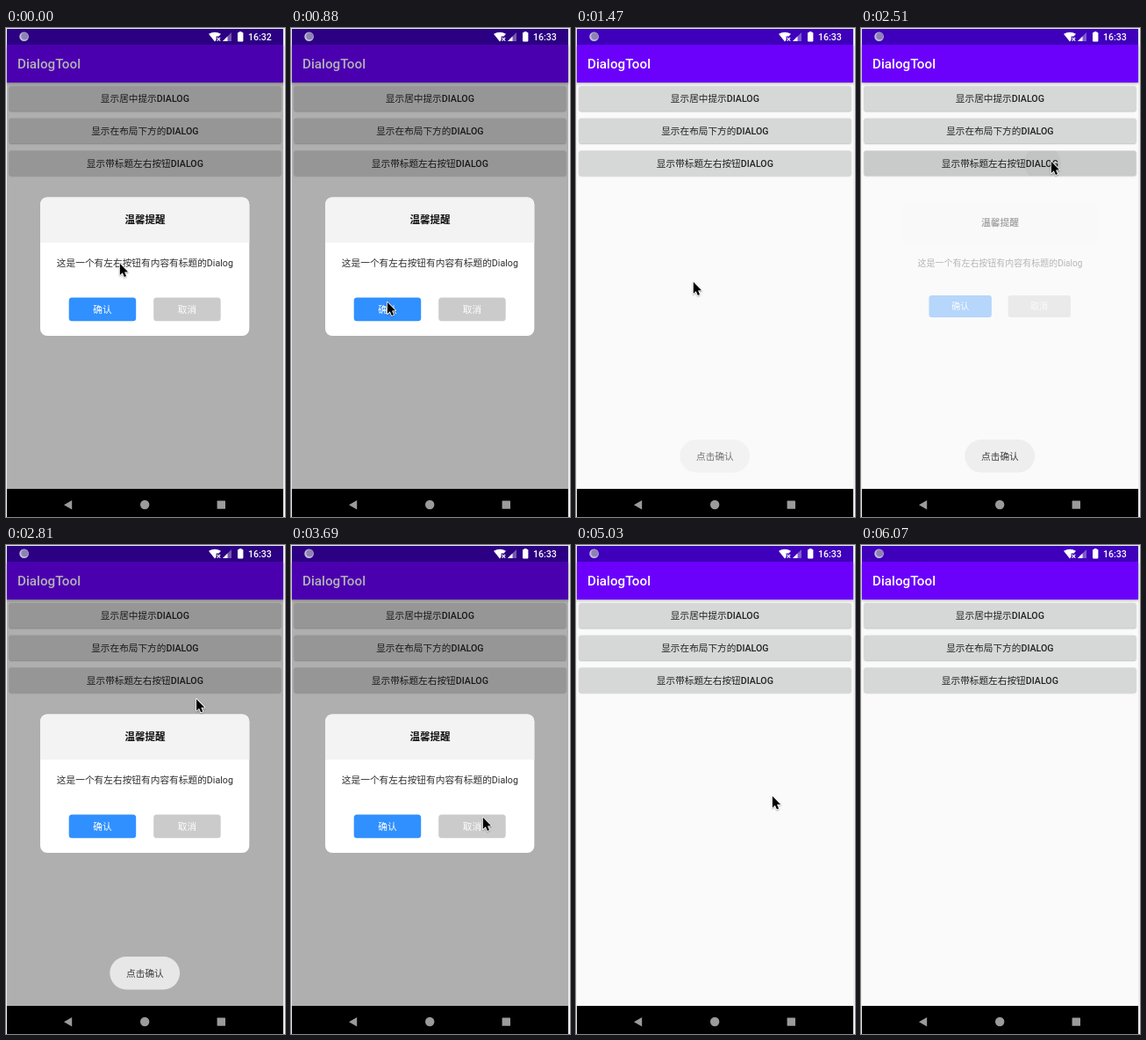
Recreate the animation shown at these times as an HTML page with a canvas. Size 318x556 px, loop 6370 ms.

```html
<!DOCTYPE html>
<html lang="zh">
<head>
<meta charset="utf-8">
<title>DialogTool</title>
<style>
html, body { margin: 0; width: 100%; height: 100%; overflow: hidden; background: #ededed; }
canvas { display: block; width: 318px; height: 556px; }
</style>
</head>
<body>
<canvas id="stage"></canvas>
<script>
const W = 318, H = 556, LOOP = 6370;
const STEP = 147.7; // ms between screen refreshes; all motion below counts in steps
const ratio = window.devicePixelRatio || 1;

function fit(canvas) {
  canvas.width = W * ratio;
  canvas.height = H * ratio;
  const pen = canvas.getContext('2d');
  pen.scale(ratio, ratio);
  return pen;
}

const stage = fit(document.getElementById('stage'));
const layer = fit(document.createElement('canvas'));
let ctx = stage;

const LATIN = 'Roboto, "Noto Sans", sans-serif';
const HAN = '"Noto Sans CJK SC", "Noto Sans CJK", Roboto, sans-serif';
const MID = 158.4;

const ramp = (s, a, b) => Math.min(1, Math.max(0, (s - a) / (b - a)));
const mix = (a, b, p) => a + (b - a) * p;
const linear = p => p;
const easeInOut = p => p < .5 ? 4 * p ** 3 : 1 - 4 * (1 - p) ** 3;

// Open from the start, closed at step 8, opened at 16.5, closed again at 26.
function presence(s, openLag, openTime, closeLag, closeTime) {
  const part = (at, lag, time) => ramp(s, at + lag, at + lag + time);
  return 1 - part(8, closeLag, closeTime) + part(16.5, openLag, openTime) - part(26, closeLag, closeTime);
}

const MOVES = [
  { from: 2, to: 6, x: 109, y: 311, ease: linear },
  { from: 9, to: 10, x: 133, y: 288, ease: linear },
  { from: 10, to: 14, x: 216, y: 151, ease: linear },
  { from: 17, to: 23, x: 218, y: 309, ease: easeInOut }
];

function cursorAt(s) {
  let x = 129, y = 267;
  for (const move of MOVES) {
    const p = move.ease(ramp(s, move.from, move.to));
    x = mix(x, move.x, p);
    y = mix(y, move.y, p);
  }
  // leaves in an arc: up a little, then down off the screen
  const p = ramp(s, 33, 41);
  const bend = (a, b, c) => mix(mix(a, b, p), mix(b, c, p), p);
  return [bend(x, 238, 262), bend(y, 180, 556)];
}

function rect(x, y, w, h, color) {
  ctx.fillStyle = color;
  ctx.fillRect(x, y, w, h);
}

function box(x, y, w, h, r, color) {
  ctx.beginPath();
  ctx.roundRect(x, y, w, h, r);
  ctx.fillStyle = color;
  ctx.fill();
}

function disc(x, y, r, color) {
  ctx.beginPath();
  ctx.arc(x, y, r, 0, Math.PI * 2);
  ctx.fillStyle = color;
  ctx.fill();
}

function poly(points, color) {
  ctx.beginPath();
  points.forEach(([x, y]) => ctx.lineTo(x, y));
  ctx.closePath();
  ctx.fillStyle = color;
  ctx.fill();
}

function label(str, x, y, font, color) {
  ctx.font = font;
  ctx.fillStyle = color;
  ctx.fillText(str, x, y);
  return ctx.measureText(str).width;
}

// Centres a Chinese run followed by a Latin run.
function centred(han, latin, x, y, color, size = 10.67, hanWeight = 400, latinWeight = 500) {
  const hanFont = `${hanWeight} ${size}px ${HAN}`;
  const latinFont = `${latinWeight} ${size}px ${LATIN}`;
  ctx.font = hanFont;
  let width = ctx.measureText(han).width;
  ctx.font = latinFont;
  width += ctx.measureText(latin).width;
  const left = x - width / 2;
  const advance = label(han, left, y, hanFont, color);
  if (latin) label(latin, left + advance, y, latinFont, color);
}

function shadow(blur, dy, alpha) {
  ctx.shadowColor = `rgba(0,0,0,${alpha})`;
  ctx.shadowBlur = blur * ratio;
  ctx.shadowOffsetY = dy * ratio;
}

// Paints onto a separate layer so that overlapping parts fade as one.
function faded(alpha, paint) {
  ctx = layer;
  ctx.clearRect(0, 0, W, H);
  paint();
  ctx = stage;
  ctx.save();
  ctx.globalAlpha = alpha;
  ctx.drawImage(layer.canvas, 0, 0, W, H);
  ctx.restore();
}

function zoomed(scale, paint) {
  ctx.save();
  ctx.translate(MID, 271);
  ctx.scale(scale, scale);
  ctx.translate(-MID, -271);
  paint();
  ctx.restore();
}

function drawApp(press) {
  rect(1, 1, 315, 523, '#fafafa');
  ctx.save();
  shadow(3, 1, .35);
  rect(1, 19, 315, 43, '#6b00fb');
  ctx.restore();
  rect(1, 1, 315, 18, '#3e00ba');
  label('DialogTool', 13, 46.4, `500 15.2px ${LATIN}`, '#fff');

  ['显示居中提示', '显示在布局下方的', '显示带标题左右按钮'].forEach((text, i) => {
    const y = 66 + i * 36.7;
    ctx.save();
    shadow(1.5, .6, .25);
    box(3.5, y, 310, 28.6, 2, '#d6d7d7');
    ctx.restore();
    if (i === 2 && press > 0) {
      ctx.save();
      ctx.beginPath();
      ctx.roundRect(3.5, y, 310, 28.6, 2);
      ctx.clip();
      rect(3, y, 311, 29, `rgba(0,0,0,${.06 * press})`);
      disc(207, 154, 21 * press, `rgba(0,0,0,${.035 * press})`);
      ctx.restore();
    }
    centred(text, 'DIALOG', MID, y + 18.4, '#222');
  });
}

function drawStatus(clock) {
  disc(20.6, 9.8, 5.3, '#c3bbdc');
  disc(21.3, 9.2, 4, '#8d82b4');

  // wifi without connection
  ctx.beginPath();
  ctx.moveTo(238, 15.5);
  ctx.lineTo(231, 6.8);
  ctx.quadraticCurveTo(238, 2.6, 245, 6.8);
  ctx.lineTo(242.6, 9.6);
  ctx.lineTo(239.6, 9.6);
  ctx.lineTo(239.6, 13.6);
  ctx.fillStyle = '#fff';
  ctx.fill();
  ctx.strokeStyle = '#fff';
  ctx.lineWidth = 1.2;
  ctx.beginPath();
  ctx.moveTo(240.6, 10.8);
  ctx.lineTo(244.2, 14.6);
  ctx.moveTo(244.2, 10.8);
  ctx.lineTo(240.6, 14.6);
  ctx.stroke();

  poly([[247, 15], [257, 15], [257, 5]], 'rgba(255,255,255,.35)');
  poly([[247, 15], [252.5, 15], [252.5, 9.5]], '#fff');
  box(264, 5, 6.4, 10.4, .8, '#fff');
  rect(265.8, 4, 2.8, 1.2, '#fff');
  label(clock, 276, 13.8, `500 10.6px ${LATIN}`, '#fff');
}

function drawNav() {
  const grey = '#9b9b9b';
  rect(1, 524, 315, 32, '#000');
  poly([[66, 542.2], [75.2, 537], [75.2, 547.4]], grey);
  disc(158.2, 542, 5.2, grey);
  box(240.6, 537.6, 9.4, 9.2, .6, grey);
}

function drawPanel() {
  box(39, 192.5, 238.3, 157.5, 8, '#fff');
  box(39, 192.5, 238.3, 51.5, [8, 8, 0, 0], '#f3f3f3');
}

function drawContent() {
  centred('温馨提醒', '', MID, 222.2, '#111', 11.5, 700);
  centred('这是一个有左右按钮有内容有标题的', 'Dialog', MID, 271.3, '#2e2e2e', 10.7, 400, 400);
  box(71.7, 306.4, 76.5, 26.8, 3.5, '#3190ff');
  box(168.2, 306.4, 76.5, 26.8, 3.5, '#cbcbcb');
  centred('确认', '', 110, 324, '#fff');
  centred('取消', '', 206.4, 324, '#fff');
}

function drawDialog(alpha) {
  const scale = .9 + .1 * alpha;
  faded(alpha ** 3, () => zoomed(scale, drawPanel));
  faded(alpha, () => zoomed(scale, drawContent));
}

function drawToast(alpha) {
  ctx.save();
  ctx.globalAlpha = alpha;
  box(118.3, 468, 79.8, 37.4, 18.7, '#eee');
  centred('点击确认', '', MID, 490.9, '#2a2a2a');
  ctx.restore();
}

function drawCursor(x, y) {
  ctx.save();
  ctx.translate(x + .8, y + .8);
  ctx.scale(.86, .86);
  ctx.beginPath();
  [[0, 0], [0, 15.4], [3.5, 12.2], [5.9, 17.6], [8.4, 16.5], [6.1, 11.2], [10.8, 11]]
    .forEach(([px, py]) => ctx.lineTo(px, py));
  ctx.closePath();
  ctx.lineJoin = 'round';
  ctx.lineWidth = 2;
  ctx.strokeStyle = '#fff';
  shadow(1.5, .8, .35);
  ctx.stroke();
  ctx.shadowColor = 'transparent';
  ctx.fillStyle = '#000';
  ctx.fill();
  ctx.restore();
}

function draw(s) {
  rect(0, 0, W, H, '#ededed');
  drawApp(ramp(s, 15, 17) - ramp(s, 17, 19));
  rect(1, 1, 315, 523, `rgba(0,0,0,${.3 * presence(s, .5, 1.5, .1, 1.9)})`);
  drawDialog(presence(s, 0, 1.5, 0, 1.1));
  drawToast(.9 * (ramp(s, 9.3, 10.3) - ramp(s, 23, 25)));
  drawStatus(s < 1 ? '16:32' : '16:33');
  drawNav();
  if (s < 41) drawCursor(...cursorAt(s));
}

const start = performance.now();
function loop() {
  const now = (performance.now() - start) % LOOP;
  draw(Math.floor((now + 11) / STEP));
  requestAnimationFrame(loop);
}
loop();
</script>
</body>
</html>
```
